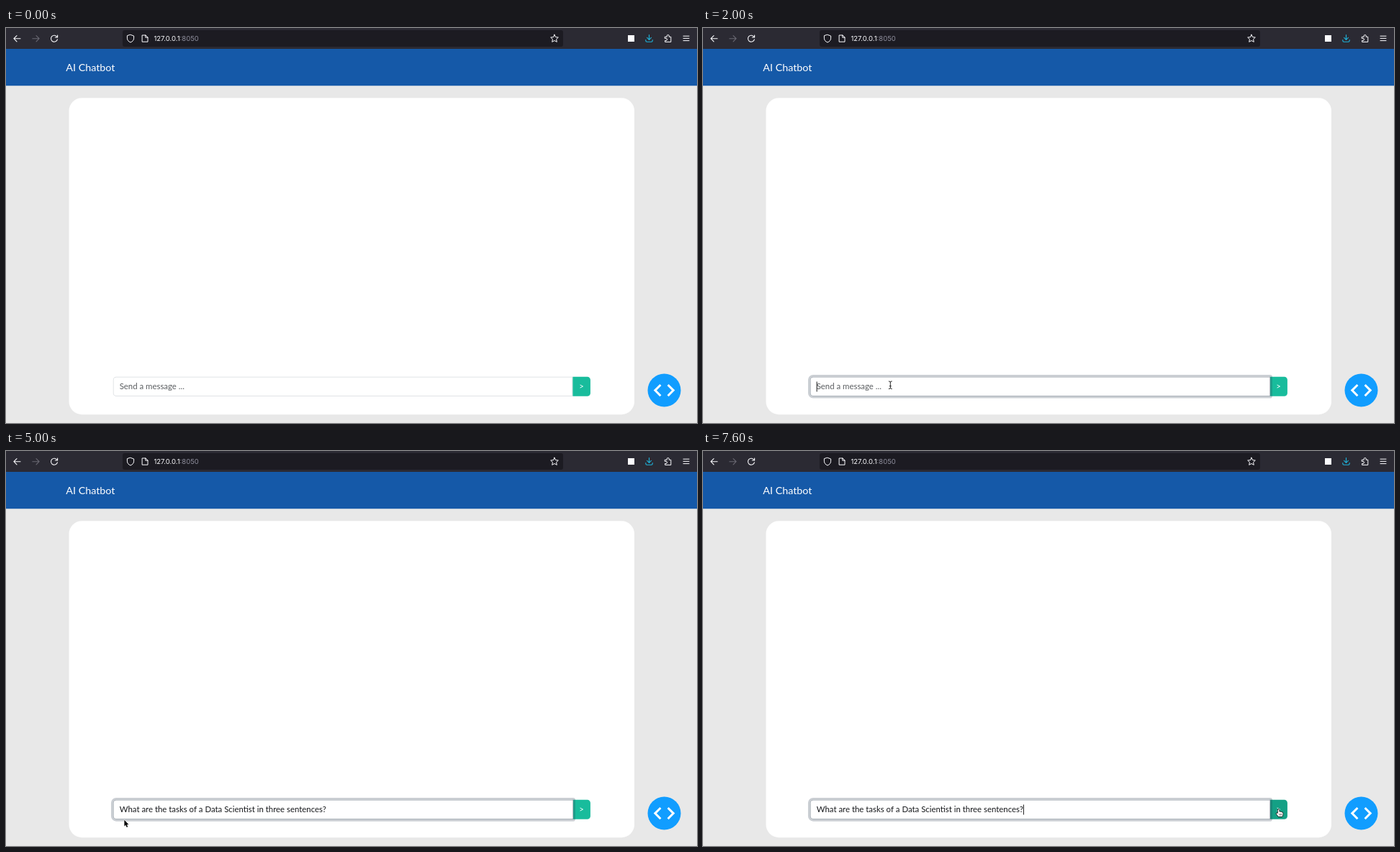
Recreate the animation shown at these times as an HTML page with a canvas. Size 960 by 549 pixels, loop 8000 ms.

```html
<!DOCTYPE html>
<html lang="en">
<head>
<meta charset="utf-8">
<title>AI Chatbot</title>
<style>
  html, body { margin: 0; width: 100%; height: 100%; overflow: hidden; background: #e8e8e8; }
  canvas { display: block; width: 960px; height: 549px; }
</style>
</head>
<body>
<canvas id="stage" width="960" height="549"></canvas>
<script>
const ctx = document.getElementById('stage').getContext('2d');
const LOOP = 8000, STEP = 100;
const QUESTION = 'What are the tasks of a Data Scientist in three sentences?';
const FOCUS_AT = 1860, PASTE_AT = 3600, HOVER_AT = 7420;
const BLINK = 567, FIRST_BLINK = 2400;

// Pointer path: time, x, y
const PATH = [
  [1100, 339.5, 535.7], [1200, 338, 537], [1300, 312, 524], [1400, 272, 504],
  [1500, 260.3, 496.3], [4300, 260.3, 496.3], [4400, 254, 497], [4600, 222, 503],
  [4800, 182, 509.5], [5000, 164.2, 512.3], [5100, 168, 514], [5200, 183, 515.3],
  [5600, 270, 516], [6100, 380, 514.6], [6300, 410, 514], [6500, 424.3, 514],
  [6900, 424.3, 514], [7000, 434, 513], [7100, 490, 510], [7200, 590, 506],
  [7300, 700, 502], [7400, 775, 500], [7500, 797, 499], [7600, 799.6, 498]
];

const clamp = v => Math.max(0, Math.min(1, v));
const ease = v => { v = clamp(v); return v * v * (3 - 2 * v); };
const mix = (a, b, k) => a + (b - a) * k;
const blend = (a, b, k) => `rgb(${a.map((v, i) => Math.round(mix(v, b[i], k)))})`;

function box(x, y, w, h, r, fill) {
  ctx.beginPath();
  ctx.roundRect(x, y, w, h, r);
  ctx.fillStyle = fill;
  ctx.fill();
}

function disc(x, y, r, fill) {
  ctx.beginPath();
  ctx.arc(x, y, r, 0, 7);
  ctx.fillStyle = fill;
  ctx.fill();
}

function line(d, color, width = 1) {
  ctx.strokeStyle = color;
  ctx.lineWidth = width;
  ctx.stroke(new Path2D(d));
}

function text(s, x, y, font, color, align = 'left') {
  ctx.font = font;
  ctx.fillStyle = color;
  ctx.textAlign = align;
  ctx.fillText(s, x, y);
  return ctx.measureText(s).width;
}

function drawBrowserBar() {
  const light = '#fbfbfe';
  box(0, 0, 960, 29, 0, '#2b2a33');
  box(162, 3, 612, 23, 3, '#1c1b22');
  ctx.lineCap = ctx.lineJoin = 'round';

  line('M20 14.7H11M15 10.6L10.9 14.7L15 18.8', light, 1.1);
  line('M36.8 14.7H46M42 10.6L46.1 14.7L42 18.8', '#6a6973', 1.1);
  line('M70.8 12.3A4.5 4.5 0 1 0 71.4 15.8M71.6 10V13H68.4', light, 1.1);

  line('M173 9.4L177.6 11V14.2C177.6 17 175.6 19 173 20C170.4 19 168.4 17 168.4 14.2V11Z', light);
  line('M189.5 10H194L197 13V19.2H189.5ZM193.8 10V13.2H197', light);
  line(star(762, 14.8, 5.6, 2.7), light);

  const font = '9.5px Inter, Roboto, sans-serif';
  const host = text('127.0.0.1', 205.4, 18.2, font, light);
  text(':8050', 205.4 + host, 18.2, font, '#8f8f9d');

  box(864, 10, 9, 9, 0, light);
  line('M893.5 9.5V16M890.6 13.4L893.5 16.3L896.4 13.4M888.8 16.5V17.6Q888.8 19.3 890.4 19.3H896.6Q898.2 19.3 898.2 17.6V16.5', '#1eb4dc', 1.1);
  line('M915.6 12.3H918.2V11A1.5 1.5 0 0 1 921.2 11V12.3H923.8V19.4H915.6V17.4H917A1.5 1.5 0 0 0 917 14.4H915.6Z', light);
  line('M941 11.2H949M941 14.4H949M941 17.6H949', light);
}

function star(x, y, outer, inner) {
  let d = '';
  for (let i = 0; i < 10; i++) {
    const r = i % 2 ? inner : outer, a = i * Math.PI / 5 - Math.PI / 2;
    d += (i ? 'L' : 'M') + (x + r * Math.cos(a)) + ' ' + (y + r * Math.sin(a));
  }
  return d + 'Z';
}

function drawPage() {
  box(0, 0, 960, 549, 0, '#e8e8e8');
  box(0, 29, 960, 51.3, 0, '#1559a8');
  text('AI Chatbot', 83.3, 60.4, '14.3px Lato, sans-serif', '#fff');
  box(87.5, 97.2, 785.5, 440, 18, '#fff');
  disc(914.5, 503.5, 23, '#119dff');
  ctx.lineCap = 'butt';
  ctx.lineJoin = 'miter';
  line('M909.4 496L901.8 503.6L909.4 511.2M919.6 496L927.2 503.6L919.6 511.2', '#fff', 3);
}

function drawForm(t) {
  const font = '11.4px Lato, sans-serif';
  const focus = ease((t - FOCUS_AT) / 150), hover = ease((t - HOVER_AT) / 150);
  const left = [4.3, 0, 0, 4.3];

  box(787.3, 484.8, 24.6, 27, [0, 4.3, 4.3, 0], blend([24, 188, 156], [20, 160, 133], hover));
  text('>', 799.6, 502.4, font, '#fff', 'center');

  if (focus) {
    const grow = 2.85 * focus;
    ctx.beginPath();
    ctx.roundRect(148.8 - grow, 484.8 - grow, 639.3 + 2 * grow, 27 + 2 * grow, [4.3 + grow, grow, grow, 4.3 + grow]);
    ctx.roundRect(148.8, 484.8, 639.3, 27, left);
    ctx.fillStyle = `rgba(44,62,80,${0.25 * focus})`;
    ctx.fill('evenodd');
  }
  box(148.8, 484.8, 639.3 - (1 - focus), 27, left, blend([214, 218, 222], [150, 159, 168], focus));
  box(149.55, 485.55, 637.8 - (1 - focus), 25.5, [3.6, 0, 0, 3.6], '#fff');

  const pasted = t >= PASTE_AT;
  const width = text(pasted ? QUESTION : 'Send a message ...', 157.7, 502.4, font, pasted ? '#16181b' : '#595c5f');
  const caretOn = t >= 1900 && (t < FIRST_BLINK || Math.floor((t - FIRST_BLINK) / BLINK) % 2 === 1);
  if (caretOn) box(157.7 + (pasted ? width : 0), 491.4, 0.9, 14, 0, '#000');
}

function pointerAt(t) {
  const i = PATH.findIndex(p => p[0] > t);
  if (i === 0) return null;
  if (i < 0) return PATH[PATH.length - 1].slice(1);
  const a = PATH[i - 1], b = PATH[i], k = (t - a[0]) / (b[0] - a[0]);
  return [mix(a[1], b[1], k), mix(a[2], b[2], k)];
}

function shape(d, fill, edge, width) {
  const p = new Path2D(d);
  ctx.lineWidth = width;
  ctx.strokeStyle = edge;
  ctx.stroke(p);
  ctx.fillStyle = fill;
  ctx.fill(p);
}

function drawPointer(t) {
  const at = pointerAt(t);
  if (!at) return;
  const [x, y] = at;
  const inside = y > 485 && y < 511.5;
  ctx.save();
  ctx.translate(x, y);
  ctx.lineCap = ctx.lineJoin = 'round';
  if (inside && x >= 788) {
    shape('M-0.9 0.4Q0 -0.6 0.9 0.4V3.4Q2 2.8 2.8 3.8Q3.8 3.2 4.5 4.2Q5.8 4 6 5.2V7Q5.8 8.6 5 10H-0.2Q-1.4 8 -3 6.4Q-3.2 5 -1.8 5.2L-0.9 6Z', '#fff', '#000', 1.3);
    line('M1.2 6.3V8.3M2.7 6.3V8.3M4.2 6.3V8.3', '#000', 0.5);
  } else if (inside) {
    const beam = 'M-2 -5.3Q0 -5.3 0 -4Q0 -5.3 2 -5.3M0 -4V4M-2 5.3Q0 5.3 0 4Q0 5.3 2 5.3M-1 1.4H1';
    line(beam, 'rgba(255,255,255,.8)', 2);
    line(beam, '#111', 0.9);
  } else {
    shape('M0.2 0.5V9.3L2.1 7.5L3.5 10.7L5 10L3.6 6.9H6.2Z', '#000', '#fff', 1.2);
  }
  ctx.restore();
}

function frame(now) {
  const t = Math.floor(now % LOOP / STEP) * STEP;
  drawPage();
  drawBrowserBar();
  drawForm(t);
  drawPointer(t);
  requestAnimationFrame(frame);
}
requestAnimationFrame(frame);
</script>
</body>
</html>
```
